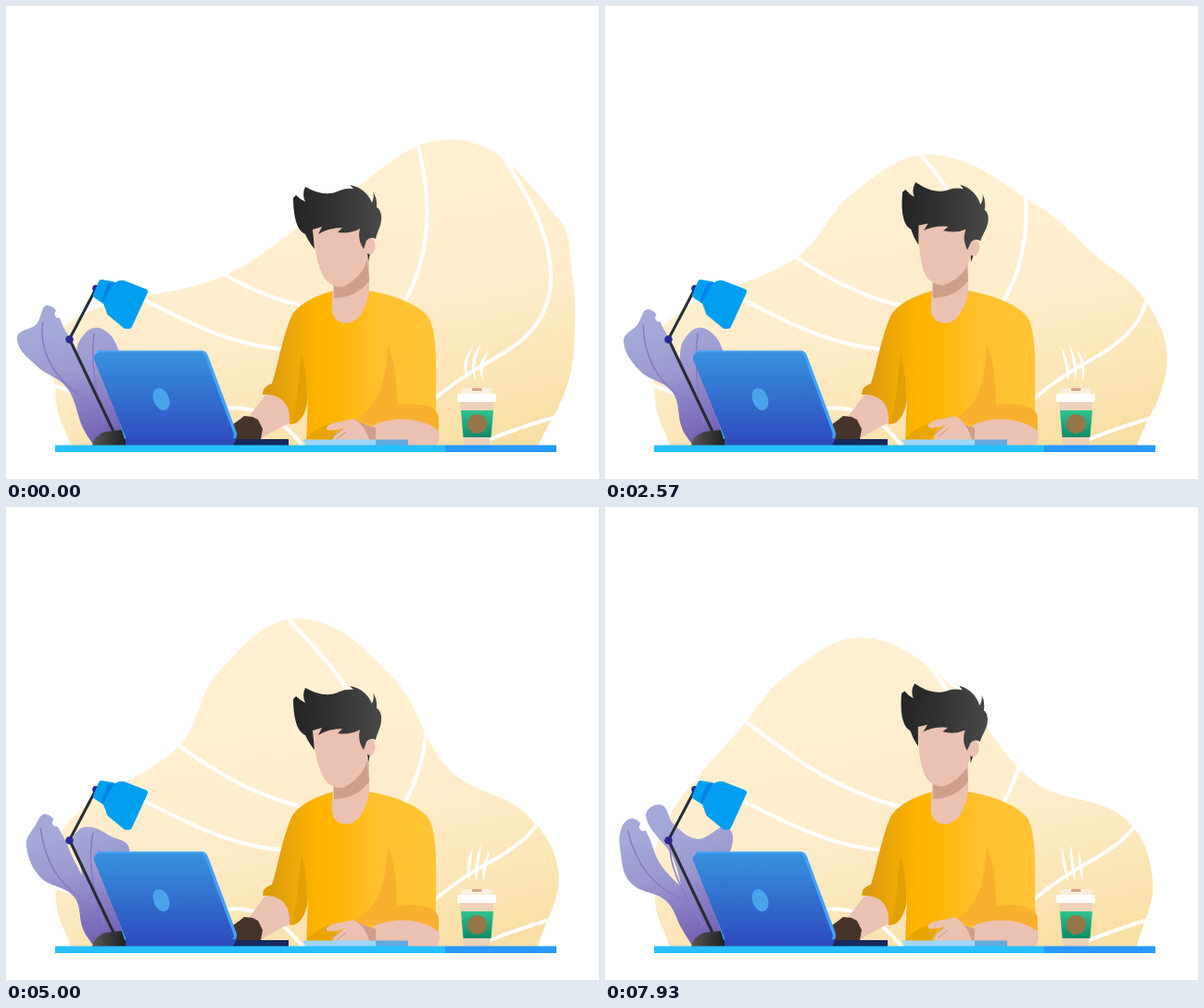
Write an HTML page that moves like this. It is 640 px wide and 510 px high and loops after 8000 ms.

```html
<!DOCTYPE html>
<html lang="en">
<head>
<meta charset="utf-8">
<title>Working at a desk</title>
<style>
  html, body { margin: 0; width: 100%; height: 100%; overflow: hidden; background: #fff; }
  svg { display: block; width: 100vw; height: 100vh; }
</style>
</head>
<body>
<svg viewBox="0 0 640 510" preserveAspectRatio="xMinYMin meet">
  <defs>
    <linearGradient id="sand" gradientUnits="userSpaceOnUse" x1="310" y1="200" x2="370" y2="500">
      <stop offset="0" stop-color="#fff0d2"/><stop offset=".45" stop-color="#feedcb"/><stop offset="1" stop-color="#f8dfa5"/>
    </linearGradient>
    <linearGradient id="leaf" gradientUnits="userSpaceOnUse" x1="50" y1="350" x2="88" y2="472">
      <stop offset="0" stop-color="#a5a9d8"/><stop offset=".4" stop-color="#9b98cf"/><stop offset="1" stop-color="#7360b4"/>
    </linearGradient>
    <linearGradient id="shirt" gradientUnits="userSpaceOnUse" x1="285" y1="0" x2="465" y2="0">
      <stop offset="0" stop-color="#dc9b0e"/><stop offset=".28" stop-color="#ffb400"/>
      <stop offset=".42" stop-color="#ffb708"/><stop offset=".65" stop-color="#ffc12f"/><stop offset="1" stop-color="#ffc436"/>
    </linearGradient>
    <linearGradient id="hairTone">
      <stop offset="0" stop-color="#242424"/><stop offset=".4" stop-color="#303030"/><stop offset="1" stop-color="#494949"/>
    </linearGradient>
    <linearGradient id="screen" x2="0" y2="1">
      <stop offset="0" stop-color="#3792df"/><stop offset="1" stop-color="#2e4fc0"/>
    </linearGradient>
    <linearGradient id="lampBase">
      <stop offset="0" stop-color="#575757"/><stop offset="1" stop-color="#1e1e1e"/>
    </linearGradient>
    <linearGradient id="cupBand" x2="0" y2="1">
      <stop offset="0" stop-color="#2fc48e"/><stop offset="1" stop-color="#0e8b68"/>
    </linearGradient>
    <clipPath id="blobClip"><path id="blobEdge"/></clipPath>
  </defs>

  <g clip-path="url(#blobClip)">
    <rect width="640" height="510" fill="url(#sand)"/>
    <g fill="none" stroke="#fff" stroke-width="4">
      <path d="M526 147C565 205 588 245 588 292C588 345 550 368 520 384C498 396 480 409 462 424"/>
      <path d="M443 144C460 205 460 270 428 322"/>
      <path d="M290 104C320 138 350 167 372 202"/>
      <path d="M146 227C200 268 250 307 322 324"/>
      <path d="M82 289C150 308 210 362 298 370"/>
      <path d="M236 434C270 430 300 445 322 477"/>
      <path d="M516 470C545 457 570 450 600 441M45 408Q75 414 100 432"/>
    </g>
  </g>

  <g id="plant">
    <path id="leafRight" fill="url(#leaf)"/>
    <path id="leafLeft" fill="url(#leaf)"/>
    <path id="veins" fill="none" stroke="#8d78c6" stroke-width="1.5"/>
    <circle id="notch" r="4.5" fill="#fff"/>
  </g>

  <g id="lamp">
    <path d="M98 303L68.5 359L118 463" fill="none" stroke="#282c35" stroke-width="3"/>
    <circle cx="68.5" cy="359.5" r="4.3" fill="#2b2a8e"/>
    <circle cx="97" cy="304.5" r="3.8" fill="#2b2a8e"/>
    <path d="M93 474Q95 463 107 459L125 457Q130 464 130 474Z" fill="url(#lampBase)"/>
    <g stroke-linejoin="round" stroke-width="6">
      <path d="M97 312L103 298L115 300L106 318Z" fill="#009ff0" stroke="#009ff0"/>
      <path d="M103 317L110 299L118 298L107 323Z" fill="#0083e6"/>
      <path d="M108 320L118 302Q122 298 127 299L150 308L133 345L129 345L112 331Z" fill="#009ff0" stroke="#009ff0"/>
    </g>
  </g>

  <g id="person">
    <path d="M262 443L281 418L308 422L307 449Q294 455 274 467Z" fill="#ebc1b1"/>
    <path d="M354 307C334 312 313 322 307 337C297 362 293 390 287 407Q277 410 277 419C296 418 308 428 306 451Q316 451 321 441Q326 430 326 418L324 474H464V378C463 355 460 339 454 333C440 319 415 311 392 307Z" fill="url(#shirt)"/>
    <path d="M319 376C315 400 316 425 308 450Q321 449 325 428Q325 395 319 376Z" fill="#e2a006"/>
    <path d="M324 467C335 455 345 450 362 448L352 468Z" fill="#e9a501"/>
    <path d="M412 366C422 390 421 410 422 430C445 428 468 430 467 446L467 458C450 444 425 443 399 452L374 447C400 435 410 410 412 366Z" fill="#f9b02f"/>
    <path d="M354 290L392 270V307C389 325 381 342 367 342Q349 341 352 318Z" fill="#ebc1b1"/>
    <path d="M354 298L390 274L392 296Q379 314 354 315Z" fill="#cf9f8e"/>
    <g id="head">
      <path d="M390 266L393 267L391 275Z" fill="#2c2c2c"/>
      <ellipse cx="393" cy="259" rx="5.5" ry="9" fill="#ebc1b1"/>
      <path d="M331 238C333 265 337 283 344 294Q351 303 363 303Q380 296 388 279L391 262L386 232Z" fill="#ebc1b1"/>
      <path d="M333 262Q327 255 323 246C313 242 310 224 310 207L313 204Q318 209 323 211Q319 203 323 195C336 202 348 205 360 199Q367 196 375 197L371 193Q388 196 395 212Q398 206 396 200Q401 208 400 217Q404 219 405 226C406 236 401 242 399 251Q393 248 389 253L386 262Q379 252 382 240Q372 246 358 244L363 239Q348 239 337 246L341 238L331 241Z" fill="url(#hairTone)"/>
    </g>
  </g>

  <g id="laptop">
    <path d="M247 467H305V474H240Z" fill="#17285c"/>
    <path d="M245 451L252 446L257 442L266 443L272 446L277 456L275 467H248Z" fill="#46342b"/>
    <path d="M98 371.5H212Q216 372 218 377L249 460Q250 466 245 467H128Z" fill="#43a2f6"/>
    <path d="M101 373.5H210Q214 374 215 378L245 459Q248 466 241 467H130L95 381Q94 374 101 373.5Z" fill="url(#screen)"/>
    <path d="M129 466H249L245 474H129Z" fill="#2e4cba"/>
    <ellipse cx="167.5" cy="424" rx="8.3" ry="12.5" transform="rotate(-22 167.5 424)" fill="#4aa4ea"/>
  </g>

  <g id="writing">
    <path d="M397 452C415 443 447 442 467 458Q470 470 463 474H433L397 468Z" fill="#ebc1b1"/>
    <path d="M374 446L399 455V469H385Z" fill="#cf9f8e"/>
    <g id="hand">
      <path d="M346 454Q350 449 362 448L375 445Q388 452 393 471H352Q352 464 360 458L366 454Q354 459 346 457Z" fill="#ebc1b1"/>
      <path d="M352 465L363 456M357 467L367 459" fill="none" stroke="#cf9f8e" stroke-width="1.2"/>
    </g>
    <path d="M320 467.5H399V474H324Z" fill="#9fd6fa"/>
    <path d="M399 467.5H434V474H399Z" fill="#62a9df"/>
  </g>

  <g id="cup">
    <path id="steam" fill="#fff"/>
    <path d="M490 427H526L522 474H494Z" fill="#ebd2b9"/>
    <path d="M491 436H526L523.5 465H493.5Z" fill="url(#cupBand)"/>
    <circle cx="508.5" cy="450.5" r="10.5" fill="#967548"/>
    <rect x="491" y="412" width="34" height="8" rx="2" fill="#f8eedb"/>
    <rect x="503" y="412" width="10.5" height="3" rx="1" fill="#dca488"/>
    <rect x="487" y="418" width="42" height="9" rx="2" fill="#fff"/>
  </g>

  <rect x="53" y="473.5" width="421" height="7.5" fill="#27befc"/>
  <rect x="474" y="473.5" width="120" height="7.5" fill="#2799fc"/>
</svg>

<script>
const LOOP = 8000;
const $ = id => document.getElementById(id);
const setPath = (id, d) => $(id).setAttribute('d', d);
const points = text => text.split(' ').map(pair => pair.split(',').map(Number));
const clamp = v => Math.max(0, Math.min(1, v));
const smooth = u => u * u * (3 - 2 * u);
const mix = (from, to, u) => from.map(([x, y], i) => [x + (to[i][0] - x) * u, y + (to[i][1] - y) * u]);
const sway = (shape, dx) => shape.map(([x, y]) => [x + dx, y]);

// The hill's outline from left foot over the summit to the right flank
const HILL = [
  { at: 0,    shape: points('237,290 352,214 485,144 597,230 611,290 614,345 606,408') },
  { at: 1710, shape: points('217,277 282,213 382,177 510,222 560,260 592,304 609,385') },
  { at: 3500, shape: points('198,263 252,189 325,142 425,211 495,277 572,329 604,385') },
  { at: 6000, shape: points('180,253 213,172 312,106 412,165 468,288 553,331 591,400') },
  { at: 8000, shape: points('151,231 195,182 277,142 370,191 462,296 560,335 591,402') }
];
const LEFT_LEAF = {
  start: points('66,412 33,388 12,358 33,343 46,323 64,350 80,380'),
  end: points('66,425 27,405 16,368 18,345 30,336 44,350 60,386')
};
const RIGHT_LEAF = {
  start: points('76,395 76,375 80,360 95,347 112,354 123,374'),
  end: points('74,380 44,334 60,321 74,342 100,358 134,347')
};

function hill(time) {
  const next = HILL.findIndex(pose => pose.at > time);
  const from = HILL[next - 1], to = HILL[next];
  const u = (time - from.at) / (to.at - from.at);
  // the first move starts fast and settles
  return mix(from.shape, to.shape, next === 1 ? u * (1.4 - .4 * u) : u);
}

// Smooth curve whose handles follow the neighbours and scale with each span
function curve(pts) {
  const at = i => pts[Math.max(0, Math.min(pts.length - 1, i))];
  const handle = (i, reach) => {
    const [ax, ay] = at(i - 1), [bx, by] = at(i + 1), [x, y] = at(i);
    const k = reach / Math.hypot(bx - ax, by - ay);
    return [x + (bx - ax) * k, y + (by - ay) * k];
  };
  let d = 'M' + at(0);
  for (let i = 1; i < pts.length; i++) {
    const [ax, ay] = at(i - 1), [bx, by] = at(i);
    const reach = .36 * Math.hypot(bx - ax, by - ay);
    d += `C${handle(i - 1, reach)} ${handle(i, -reach)} ${[bx, by]}`;
  }
  return d + 'Z';
}

// 0 = leaning left, 1 = upright
function headPose(time) {
  const t = time % 5000, turn = 2200;
  if (t < turn) return Math.sin(Math.PI / 2 * t / turn);
  const u = (t - turn) / (5000 - turn);
  return (Math.cos(Math.PI / 2 * u) + (1 + Math.cos(Math.PI * u)) / 2) / 2;
}

function steamPath(time) {
  const wave = shift => Math.cos(2 * Math.PI * (time / 6000 + shift));
  return [0, 1, 2].map(i => {
    const dx = 9 * i;
    const tip = [498.5 + dx + 6.5 * wave(.08), [367, 364, 371][i]];
    const base = [500 + dx * .85, 404];
    const bend = 496 + dx - 8 * wave(-.1);
    return `M${tip}Q${bend - 3},385 ${base}Q${bend + 4},387 ${tip}Z`;
  }).join('');
}

function drawPlant(time) {
  const drift = Math.sin(Math.PI * time / LOOP);
  const left = sway(mix(LEFT_LEAF.start, LEFT_LEAF.end, time / LOOP), 8 * drift);
  const unfold = smooth(clamp((time - 3500) / 4000));
  const right = sway(mix(RIGHT_LEAF.start, RIGHT_LEAF.end, unfold), 6 * drift);
  setPath('leafLeft', curve([[95, 474], [83, 455], ...left, [100, 430], [118, 474]]));
  setPath('leafRight', curve([[98, 474], [88, 440], ...right, [130, 390], [124, 474]]));

  const [, low, side, brow, top] = left;
  const ribTop = [(brow[0] + top[0]) / 2, (brow[1] + top[1]) / 2 + 8];
  setPath('veins', `M${ribTop}Q${side[0] + 22},${low[1]} 82,422`
    + `M${right[3][0]},${right[3][1] + 6}Q${right[1][0] + 14},${right[0][1]} 106,450`);
  $('notch').setAttribute('transform', `translate(${top[0] + 11} ${top[1] + 9})`);
}

function draw(time) {
  setPath('blobEdge', curve([[70, 474], [54, 425], [63, 345], ...hill(time), [574, 474]]));
  drawPlant(time);
  const pose = headPose(time);
  $('head').setAttribute('transform', `translate(${1.5 * pose} ${-1.7 * pose}) rotate(${6 * pose} 362 300)`);
  $('hand').setAttribute('transform', `translate(${3 * pose} ${-3 * pose})`);
  setPath('steam', steamPath(time));
}

const start = performance.now();
function tick() {
  draw((performance.now() - start) % LOOP);
  requestAnimationFrame(tick);
}
tick();
</script>
</body>
</html>
```
